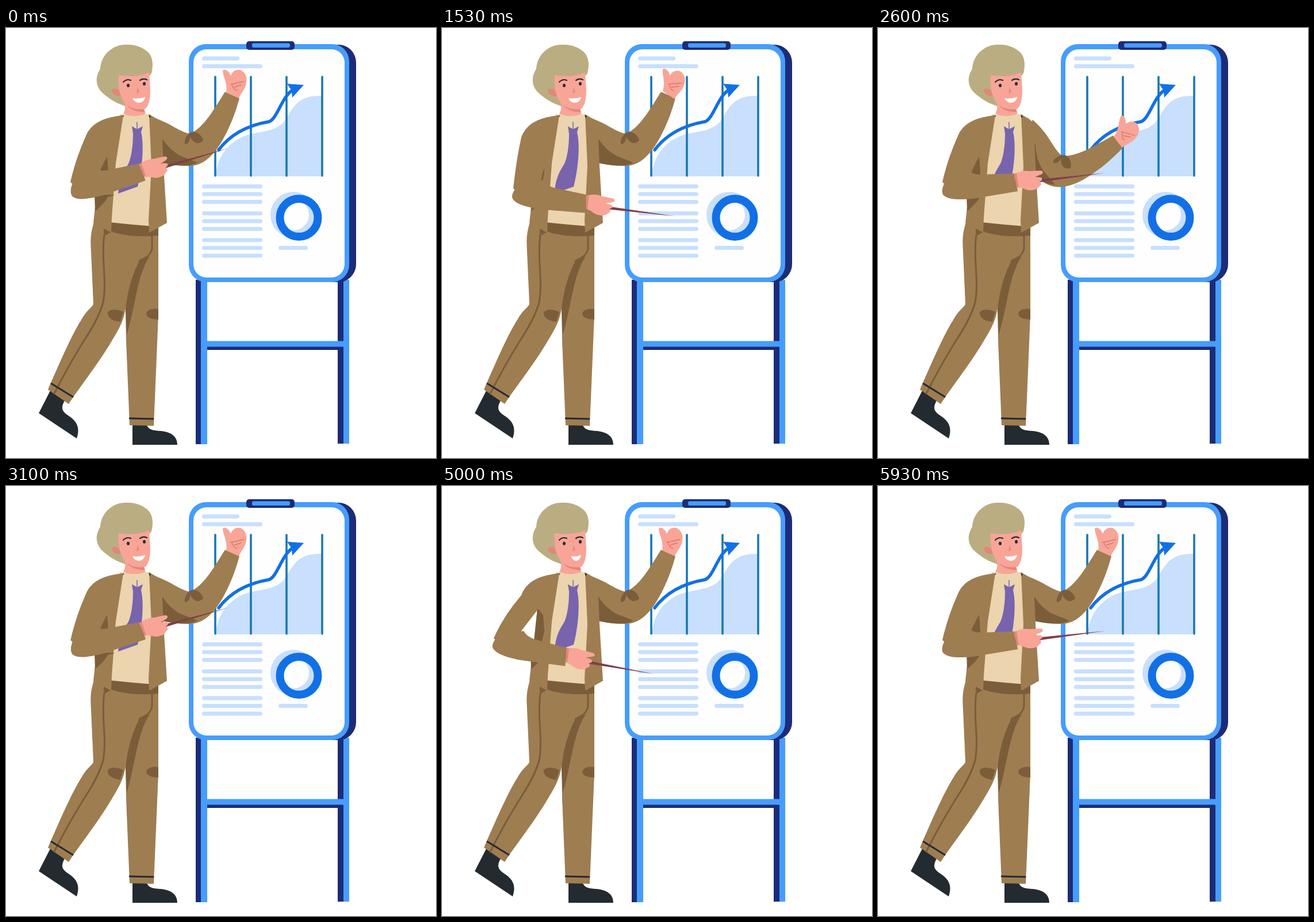
Recreate the animation shown at these times as an HTML page. Size 748x748 px, loop 6010 ms.

```html
<!DOCTYPE html>
<html lang="en">
<head>
<meta charset="utf-8">
<title>Presenter at a flip chart</title>
<style>
  html, body { margin: 0; width: 100%; height: 100%; overflow: hidden; background: #fff; }
  svg { display: block; width: 100vw; height: 100vh; }
  .suit { fill: #9e7d51; }
  .fold { fill: #7b5d3a; }
  .skin { fill: #f8a598; }
  .shade { fill: #e2877a; }
  .ink { fill: #232b30; }
  .navy { fill: #1c2c78; }
  .blue { fill: #469dfd; }
  .pale { fill: #c8dffe; }
  .line { fill: none; stroke-linecap: round; stroke-linejoin: round; }
</style>
</head>
<body>
<svg viewBox="0 0 748 748" xmlns="http://www.w3.org/2000/svg">
  <g id="board">
    <path class="navy" d="M330 438h10v286h-10zM577 438h10v285h-10zM350 554h227v6H350z"/>
    <path class="blue" d="M339 438h11v286h-11zM587 438h10v285h-10zM350 544.500h237v10H350z"/>
    <rect class="navy" x="480" y="29" width="129" height="413" rx="31"/>
    <rect class="blue" x="318" y="28" width="279" height="414" rx="30"/>
    <rect x="326" y="37" width="263" height="397" rx="23" fill="#fefefe"/>
    <rect class="navy" x="418" y="23" width="84" height="15" rx="5"/>
    <rect class="blue" x="428" y="26.500" width="66" height="7.500" rx="3"/>
    <g id="bars" class="line" stroke="#c8dffe" stroke-width="7"></g>
    <path class="pale" d="M365 258C367 226 384 201 414 188C440 179 464 182 482 165C499 142 503 118 546 118H550V258Z"/>
    <path class="line" stroke="#1878b4" stroke-width="3.600" d="M364 85V257M426 85V257M488 85V257M550 85V257"/>
    <path class="line" stroke="#1270e6" stroke-width="5.500" d="M370 212C394 180 428 168 457 163C472 159 480 118 499 108"/>
    <path fill="#1270e6" d="M489 97L518 99L498 121L497 109Z"/>
    <circle cx="500" cy="325" r="33.500" fill="none" stroke="#c8dffe" stroke-width="13"/>
    <circle cx="509.500" cy="330" r="33" fill="none" stroke="#1270e6" stroke-width="14"/>
  </g>

  <g id="legs">
    <path class="ink" d="M80 625L108 640L101 650C95 662 98 667 108 674C122 683 130 694 123 714L57 670Z"/>
    <path class="ink" d="M220 688H244C247 699 254 700 270 701C287 703 298 710 298 725H220Z"/>
    <path class="suit" d="M154 335C146 358 147 372 148 390L152 480C150 486 141 490 132 506C115 532 93 583 73 629L109 654C130 622 163 581 186 541C200 518 205 506 208 488L209 545L215 691L257 692L265 500V350Z"/>
    <path class="fold" d="M208 491C212 450 222 425 232 405L250 397C228 430 226 480 210 534Z"/>
    <path class="line" stroke="#7b5d3a" stroke-width="3" d="M254 360V384C251 396 243 400 232 405M181 354L171 360C165 400 176 440 169 477C163 500 150 522 135 545C112 582 96 612 84 636"/>
    <path class="fold" d="M177 495C180 488 194 489 204 494L199 511C187 510 176 504 177 495ZM265 489C250 487 244 493 244 498C246 504 253 507 265 507Z"/>
    <path fill="none" stroke="#232b30" stroke-width="3" d="M78 618L117 642M214 679L257 680"/>
    <path class="fold" d="M170 338H265V361C235 364 205 362 183 354L170 358Z"/>
  </g>

  <g id="rightArm">
    <path class="suit" d="M245 153C284 162 300 181 320 184C345 173 363 139 381 111L406 122C396 160 380 193 365 213C350 232 335 240 318 240C300 240 285 237 273 235L245 225Z"/>
    <path class="fold" d="M268 186C278 204 291 216 305 223L333 234C318 243 292 239 268 234Z"/>
    <path class="fold" d="M322 181C332 178 342 188 343 196C334 204 326 200 320 189C320 196 318 202 311 202C310 194 314 186 322 181Z"/>
    <g id="rightHand">
      <path class="skin" d="M383 112C386 96 377 84 377 74C381 70 388 75 391 83C394 75 401 71 408 73C416 77 420 85 418 95C417 105 410 111 405 122Z"/>
      <path class="line" stroke="#d9776d" stroke-width="1.500" d="M391 98L414 93M393 98C394 104 398 109 402 108M397 103L409 99"/>
    </g>
  </g>

  <g id="torso">
    <path fill="#ebd4ae" d="M198 150H252L268 240L256 345Q218 342 180 338Z"/>
    <path class="suit" d="M204 152C188 153 172 159 158 170L166 213L152 339L183 356L184 330L191 235Z"/>
    <path class="fold" d="M166 212L176 225L178 252L172 280L160 276ZM154 290H190L177 294C172 304 162 312 155 319Z"/>
    <path class="suit" d="M249 151C259 155 268 160 271 168L274 240L280 339L249 356L248 335L253 240Z"/>
    <path fill="#7863ad" d="M219 171L228 176L238 171L235 181C240 202 238 240 229 276L195 288L197 275C200 256 207 246 213 236C218 225 221 205 221 184Z"/>
    <path class="line" stroke="#7863ad" stroke-width="1.500" d="M228 164V177"/>
    <path class="ink" d="M201 152L206 152L202 156ZM248 151L252 153L250 157Z"/>
  </g>

  <g id="head">
    <path fill="#bbad82" d="M205 135C186 129 173 118 165 110C154 97 157 82 164 71C165 46 187 28 209 29C229 28 241 37 246 41C257 51 256 66 253 79L240 95L214 140Z"/>
    <path class="skin" d="M196 82C214 85 236 84 249 77L251 108C251 126 247 140 239 142L243 149C234 154 216 155 204 149C208 143 208 136 206 129C200 122 194 104 196 82Z"/>
    <path class="shade" d="M210 134C219 141 231 142 240 141L242 146C229 147 216 142 210 134Z"/>
    <path class="shade" d="M200 118C193 120 184 115 184 108C187 104 195 106 197 111Z"/>
    <g id="face">
      <ellipse class="ink" cx="212.500" cy="100" rx="2.500" ry="3"/>
      <ellipse class="ink" cx="240.500" cy="97" rx="2.500" ry="3"/>
      <path class="line" stroke="#232b30" stroke-width="2.200" d="M204 94Q210 88 217 91M233 91Q239 87 245 90"/>
      <path class="shade" d="M229 103L232 111L227 114Z"/>
    </g>
    <path id="mouth" fill="#fff" d="M220 122Q231 124 242 120C240 132 225 134 220 122Z"/>
  </g>

  <g id="leftArm">
    <path id="upper" class="suit"/>
    <g id="lower">
      <path fill="#7f3f4b" d="M274 264L283 263L396 252L283 268L274 270Z"/>
      <path class="suit" d="M132 254L157 247Q163 254 178 255L238 253L243 284L165 297C140 299 121 299 113 290C108 280 117 262 132 254Z"/>
      <path class="shade" d="M236 254L245 251L252 278L242 277Z"/>
      <path class="skin" d="M241 253C249 248 257 248 264 249L283 248C288 249 288 253 283 255L273 259L284 260C287 263 285 266 281 267C286 271 283 275 280 276C278 281 268 283 261 282C255 281 250 277 245 278Z"/>
    </g>
  </g>
</svg>
<script>
const LOOP = 6010, CYCLE = 3040;
const part = id => document.getElementById(id);
const move = (id, value) => part(id).setAttribute("transform", value);

// Each row: time in the cycle, then the values reached.
const armKeys = [ // elbow x, elbow y, forearm angle
  [0, 132, 277, -9.5], [700, 145, 287, 13.2], [1530, 144, 288, 14],
  [1930, 110, 274, 17], [2020, 110, 274, 17], [2500, 132, 277, 0],
  [2890, 132, 277, 0], [CYCLE, 132, 277, -9.5]
];
const raiseKeys = [[0, 0], [2050, 0], [2500, 28.3], [2640, 28.3], [2860, 0]];
const twistKeys = [[1200, 0], [1530, 9], [1900, 0]];
const mouthKeys = [[1800, 1], [1930, 0.78], [2000, 0.78], [2150, 1]];
const nodKeys = [[600, 0, 0], [860, 2, 3], [1100, 0, 0]];

function sample(keys, t) {
  if (t <= keys[0][0]) return keys[0].slice(1);
  const i = keys.findIndex(k => k[0] > t);
  if (i < 0) return keys[keys.length - 1].slice(1);
  const a = keys[i - 1], b = keys[i];
  const p = (t - a[0]) / (b[0] - a[0]), e = p * p * (3 - 2 * p);
  return a.slice(1).map((v, j) => v + (b[j + 1] - v) * e);
}

// Steps alternate between 30 and 70 ms.
function stepTime(ms) {
  const t = ms % LOOP, base = Math.floor(t / 100) * 100;
  return Math.min(5930, base + (t - base >= 30 ? 30 : 0));
}

function draw(time) {
  const t = time % CYCLE;
  const [x, y, angle] = sample(armKeys, t);
  const dx = x - 132, dy = y - 277;
  part("upper").setAttribute("d",
    `M204 152C172 155 148 164 138 190Q${121 + dx * 0.7} 228 ${x - 20} ${y - 9}` +
    `L${x} ${y + 10}L${x + 28} ${y - 22}L${176 + dx * 0.4} ${223 + dx * 0.4}L192 200Z`);
  move("lower", `translate(${dx} ${dy}) rotate(${angle} 132 277)`);
  move("rightArm", `rotate(${sample(raiseKeys, t)[0]} 244 204)`);
  move("rightHand", `rotate(${sample(twistKeys, t)[0]} 396 117)`);
  move("face", `translate(${sample(nodKeys, t).join(" ")})`);
  move("mouth", `translate(241 0) scale(${sample(mouthKeys, t)[0]} 1) translate(-241 0)`);
}

const bar = (x1, x2, y) => `<path d="M${x1 + 3.5} ${y}H${x2 - 3.5}"/>`;
part("bars").innerHTML = bar(341, 406, 53) + bar(474, 525, 382.5) +
  [66.5, 275.5, 289, 302.5, 322.5, 336, 349.5, 369, 382.5, 396]
    .map(y => bar(341, 446, y)).join("");

const start = performance.now();
function tick() {
  draw(stepTime(performance.now() - start));
  requestAnimationFrame(tick);
}
tick();
</script>
</body>
</html>
```
